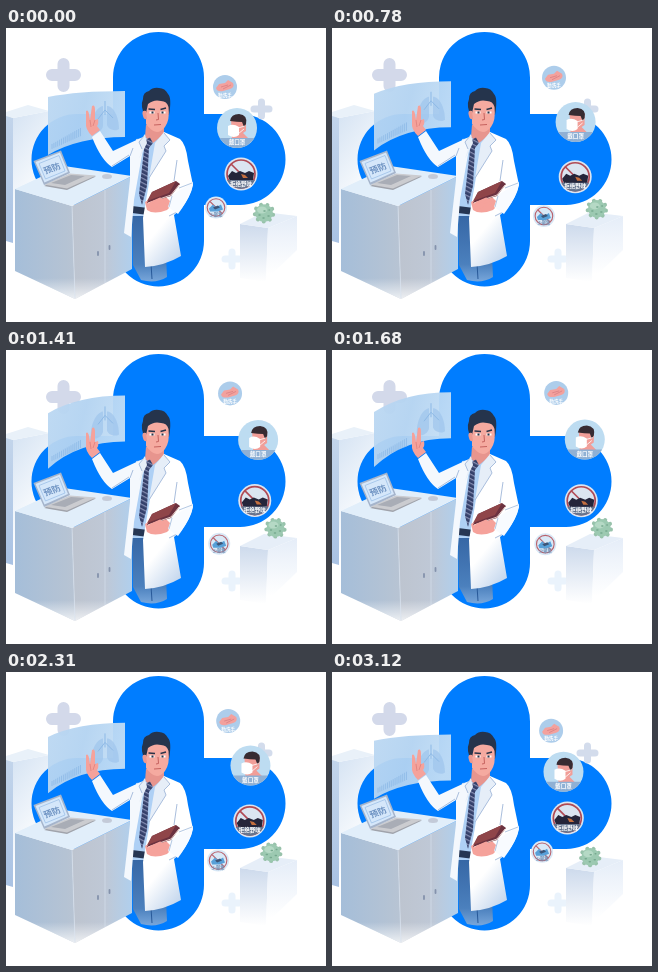
Write an HTML page that moves like this. It is 320 px wide and 294 px high and loops after 3150 ms.

```html
<!DOCTYPE html>
<html lang="zh">
<head>
<meta charset="utf-8">
<style>
html, body { margin: 0; width: 100%; height: 100%; overflow: hidden; background: #fff; }
svg { display: block; width: 100vw; height: 100vh; }
text { font-family: "Noto Sans CJK SC", "Noto Sans CJK", "Noto Sans", sans-serif; text-anchor: middle; font-weight: 700; }
</style>
</head>
<body>
<svg viewBox="0 0 320 294">
  <defs>
    <linearGradient id="pillar" x2=".35" y2="1"><stop stop-color="#d5e3f3"/><stop offset=".85" stop-color="#fff"/></linearGradient>
    <linearGradient id="pillarDark" x2="0" y2="1"><stop stop-color="#c3d5eb"/><stop offset="1" stop-color="#a9c2e3"/></linearGradient>
    <linearGradient id="standLeft" x2="0" y2="1"><stop stop-color="#cddaec"/><stop offset="1" stop-color="#fff"/></linearGradient>
    <linearGradient id="standRight" x2="0" y2="1"><stop stop-color="#e5edf8"/><stop offset=".9" stop-color="#fff"/></linearGradient>
    <linearGradient id="cabLeft"><stop stop-color="#a5bed9"/><stop offset="1" stop-color="#b8c4d3"/></linearGradient>
    <linearGradient id="cabRight"><stop stop-color="#bdc4cf"/><stop offset=".55" stop-color="#bfc8d6"/><stop offset="1" stop-color="#b0cfed"/></linearGradient>
    <linearGradient id="mist" x2="0" y2="1"><stop offset=".83" stop-color="#fff" stop-opacity="0"/><stop offset="1" stop-color="#fff" stop-opacity=".75"/></linearGradient>
    <linearGradient id="glass" x2="1" y2=".25"><stop stop-color="#bcd8f2"/><stop offset=".5" stop-color="#b3d3f1"/><stop offset="1" stop-color="#c4def5"/></linearGradient>
    <linearGradient id="coat" x1=".3" x2=".75" y2="1"><stop offset=".6" stop-color="#fff"/><stop offset="1" stop-color="#b9cfea"/></linearGradient>
    <linearGradient id="jeans" x2="0" y2="1"><stop stop-color="#3565a3"/><stop offset=".75" stop-color="#4b80bd"/><stop offset="1" stop-color="#78a6da"/></linearGradient>
    <pattern id="tie" width="5" height="4" patternUnits="userSpaceOnUse" patternTransform="rotate(28)"><path fill="#34406a" d="M0 0h5v4H0z"/><path fill="#8890b4" d="M0 0h5v1.200H0z"/></pattern>
  </defs>

  <!-- backdrop -->
  <path fill="url(#pillar)" d="M7 90 43 83V185L7 215Z"/>
  <path fill="url(#pillarDark)" d="M0 87 7 90V215L0 213Z"/>
  <path fill="#e9f1f9" d="M0 84 22 77 43 83 7 90 0 88Z"/>
  <path fill="#007dff" d="M107 86V49.500a45.500 45.500 0 0 1 91 0V86h36a45.500 45.500 0 0 1 0 91h-36v36a45.500 45.500 0 0 1-91 0v-36H71A45.500 45.500 0 0 1 71 86Z"/>
  <g stroke-linecap="round" fill="none">
    <path stroke="#d3d9ea" stroke-width="12" d="M46 47H69M57.500 36V58"/>
    <path stroke="#d3dcec" stroke-width="7" d="M248 81H263M255.500 74V88"/>
    <path stroke="#eaf3fc" stroke-width="7" d="M219 231H233M226 224V238"/>
  </g>
  <path fill="url(#standLeft)" d="M234 196 262 200 260 254 234 250Z"/>
  <path fill="url(#standRight)" d="M262 200 291 188V222L260 252Z"/>
  <path fill="#e6eef8" d="M234 196 258 184 291 188 262 200Z"/>

  <!-- hologram -->
  <path id="panel" fill="url(#glass)" opacity=".95"/>
  <g id="scan" fill="none" stroke="#8db9e6">
    <path id="ribs" stroke-width=".8"/>
    <path fill="#a0c6ec" stroke="none" opacity=".75" d="M97 78C90 79 84 92 85 104 90 107 96 103 97 98ZM101 78C107 78 113 88 113 101 109 104 102 101 101 97Z"/>
    <path d="M99 73V87M99 82 92 91M99 82 107 90"/>
  </g>

  <!-- cabinet -->
  <path fill="url(#cabLeft)" d="M9 161 66 178 69 271 9 243Z"/>
  <path fill="url(#cabRight)" d="M66 178 126 148V241L69 271Z"/>
  <path fill="url(#mist)" d="M9 161 66 178 126 148V241L69 271 9 243Z"/>
  <path fill="#e1eefa" d="M9 161 58 138 126 148 66 178Z"/>
  <path fill="none" stroke="#d5e0ee" stroke-width=".7" d="M66 178 69 270M99 162V255"/>
  <path stroke="#8492ac" stroke-width="1.800" stroke-linecap="round" d="M92 224v3M103.500 218v3"/>
  <ellipse cx="101" cy="148.500" rx="5" ry="2.500" fill="#c3cad8"/>
  <path fill="#a0a3ab" d="M38 158 64 146 90 148.500 61 162Z"/>
  <path fill="#cbccd0" d="M38 156.500 64 145.500 90 147.500 61 160.500Z"/>
  <path fill="#a9adb6" d="M45 155 65 147 79 148 59 157Z"/>
  <path fill="#a5b4cb" d="M27.500 133 55 122.500 64 145 38 157Z"/>
  <path fill="#d5e7fa" d="M29.500 134 54 124.500 62 144 38.500 154.500Z"/>
  <path fill="none" stroke="#9dc0e8" stroke-width=".8" d="M33 135.500 53 127.500 59 143 39.500 151Z"/>
  <text transform="translate(47.500 143) rotate(-20) skewX(8)" font-size="8.500" fill="#6c91c1">预防</text>

  <!-- doctor -->
  <path fill="url(#jeans)" d="M126 184H158L161 249Q150 256 135 252L127 237Z"/>
  <path fill="none" stroke="#285999" d="M142 190 146 251"/>
  <path fill="#aed0f5" d="M130 111 159 108 154 188H126Z"/>
  <path fill="#263653" d="M126 178 142 180V187L126 185Z"/>
  <path fill="#e7958e" d="M140 97H158V106L147 115 139 109Z"/>
  <path fill="url(#tie)" d="M139 112 144 109.500 147 115 143 120 141 158 136 177 133 166 138 122Z"/>
  <path fill="#25344c" d="M139 88Q134 78 137 71 137 64 143 63 147 59 153 60 159 60 162 66 166 70 163 87L151 78Z"/>
  <path fill="#f5aaa0" d="M140 85 142 76Q148 71 155 73 161 73 162.500 79 164 92 159 99 155 104 151 104 145 103 140 96Z"/>
  <path fill="#eb9990" d="M140 83Q135 82 137 88 138 92 141 91Z"/>
  <path fill="none" stroke="#293449" stroke-width="1.500" d="M142.500 81 149 81.500M154.500 81.500 160 80"/>
  <path stroke="#fff" stroke-width="2" d="M143.500 84.500h5M154.500 84.500h5"/>
  <path stroke="#293449" stroke-width="2.200" d="M145.500 84.500h2M155.500 84.500h2"/>
  <path fill="none" stroke="#c5625f" d="M152 85 152.500 91.500 150 92M148 97 155 96.500"/>
  <path fill="#f4f8fd" d="M137 109 124 115 107 123 94 103 86 109Q95 132 106 139L124 128 124 152 118 205 125 209 128 172 137 121Z"/>
  <path fill="url(#coat)" d="M158 104 174 111Q180 116 182 133L187 157Q185 168 175 181L168 187 175 228Q158 238 139 239L137 190 148 126Z"/>
  <path fill="#e6eef8" d="M139 106 133 114 136 121 133 131 141 115ZM158 104 164 112 158 118 160 123 143 150 149 115Z"/>
  <path fill="none" stroke="#a9bedd" d="M158 105 164 112 158 118 160 123 143 150M138 108 133 114 136 121M124 128 127 120M171 132 168 153M163 188 171 184M106 138 123 127"/>
  <path fill="#f5a29b" d="M94 102 86 108Q79 101 80 95L80 83Q82 81 83 86L84 92 86 78Q89 76 89 82L89 92 92 91Q93 96 91 98Z"/>
  <path fill="none" stroke="#de817e" stroke-width=".8" d="M84 92 85 99M89 92 87 98"/>
  <path fill="#f5a29b" d="M139 174Q148 168 160 169L167 176 161 182Q148 187 141 182Z"/>
  <path fill="#6b3240" d="M146 164 170 153 174 156 165 168 141 175Z"/>
  <path fill="#8f4549" d="M146 164 170 153 163 165 141 173Z"/>
  <path fill="none" stroke="#f2dfd9" stroke-width=".9" d="M142 175 165 167 173 157"/>
  <path fill="none" stroke="#f5a29b" stroke-width="3" stroke-linecap="round" d="M145 175 154 171M147 179 158 175"/>
  <path fill="#f8fbff" d="M166 167 187 154Q186 167 172 186L162 179Z"/>
  <path fill="none" stroke="#b3c8e3" d="M166 168 163 179M173 160 186 155"/>

  <!-- floating badges -->
  <g id="wash">
    <circle r="12" fill="#adcdeb"/>
    <path fill="#f3a19d" d="M-9 1-6-3 0-4 3-7 8-4Q10 0 5 2L-2 4Q-8 5-9 1Z"/>
    <path fill="none" stroke="#d97f83" stroke-width=".8" d="M-4 0 3-2M-2 2 6-2"/>
    <text y="9.800" font-size="4.600" fill="#fff">勤洗手</text>
  </g>
  <g id="mask">
    <circle r="20" fill="#bddcf1"/>
    <path fill="#f19e98" d="M-6-9H9L9 3 6 5 13 12H-5Z"/>
    <path fill="#372b32" d="M-7-7Q-6-14 2-14 11-13 9-4L7-1 5-6Q0-6-7-7Z"/>
    <path fill="#fff" d="M-9-2Q-4-5 2-1L2 7Q-3 11-9 7Z"/>
    <path stroke="#fff" stroke-width=".8" fill="none" d="M1 0 8-2M1 6 7 1"/>
    <path fill="#8fb0d4" d="M-17.300 10H17.300A20 20 0 0 1-17.300 10Z"/>
    <text y="16" font-size="5.600" fill="#fff">戴口罩</text>
  </g>
  <g id="game">
    <circle r="16.500" fill="#dbe5f1"/>
    <g fill="none" stroke="#b04a55" stroke-width="1.700"><circle r="14"/><path d="M-10-10 10 10"/></g>
    <path fill="#25253a" d="M-13 2-9-3-5-1-1-3 4-1 8-3 13-1 12 6 6 7-11 7Z"/>
    <path fill="#c56f3f" d="M0 0 4 1 7 4 2 4Z"/>
    <path fill="#66758f" d="M-14 6H14Q10 14 0 15-10 14-14 6Z"/>
    <text y="11.500" font-size="5.500" fill="#fff">拒绝野味</text>
  </g>
  <g id="crowd">
    <circle r="11" fill="#d9e9f7"/>
    <g fill="none" stroke="#b9626c" stroke-width="1.100"><circle r="8.800"/><path d="M-6-6 6 6"/></g>
    <path fill="#58a0d8" d="M-7 1-3-3 0 0 5-3 7 2 2 4-6 4Z"/>
    <path fill="#3c5578" d="M-3 0 2-2 4 0-1 2Z"/>
    <text y="8" font-size="4.300" fill="#6f8fb4">少聚集</text>
  </g>
  <g id="virus"></g>
</svg>
<script>
const LOOP = 3150;
const $ = id => document.getElementById(id);
const mix = (a, b, p) => a + (b - a) * p;
const swing = (t, peak) => t < peak ? t / peak : (LOOP - t) / (LOOP - peak);
const soften = p => mix(p, Math.sin(p * Math.PI / 2), 0.25);

// id: [start x, start y, far x, far y]
const drift = {
  wash: [219, 59, 224.5, 42],
  mask: [231, 100, 254, 89],
  game: [235, 146, 250, 151],
  crowd: [210, 179.5, 213.5, 195],
  virus: [258, 185, 270.5, 177.5]
};

function buildVirus() {
  let spikes = '';
  for (let i = 0; i < 9; i++) {
    const a = i * Math.PI * 2 / 9 + 0.2;
    const x = Math.cos(a), y = Math.sin(a);
    spikes += `<path stroke="#98c2ab" stroke-width="4" stroke-linecap="round" d="M${x * 6} ${y * 6}L${x * 9.3} ${y * 8.5}"/>`;
  }
  $('virus').innerHTML = spikes +
    '<circle r="8.8" fill="#9cc9b1"/><ellipse cx="-2" cy="-3" rx="5" ry="3.5" fill="#b5d9c5"/>' +
    '<path stroke="#76a98f" stroke-width="1.5" stroke-linecap="round" d="M-5 2h1M0-2h1M4 3h1M-1 5h1M5-3h.5"/>';
}

function buildRibs() {
  let d = '';
  for (let i = 0; i < 16; i++) {
    const x = 46 + i * 1.9, y = 121 - i * 0.85;
    d += `M${x} ${y}v${-5 - i * 0.22}`;
  }
  $('ribs').setAttribute('d', d);
}

function render(t) {
  const p = soften(swing(t, LOOP / 2));
  for (const [id, [x, y, fx, fy]] of Object.entries(drift)) {
    $(id).setAttribute('transform', `translate(${mix(x, fx, p)} ${mix(y, fy, p)})`);
  }
  const lift = swing(t, 1700);
  const topL = mix(69, 62, lift), topR = mix(63, 42, lift);
  const lowL = mix(127, 117, lift), lowR = mix(109, 88, lift);
  $('panel').setAttribute('d',
    `M42 ${topL}Q72 ${topR} 119 ${topR}V${lowR}Q72 ${lowR} 42 ${lowL}Z`);
  $('scan').setAttribute('transform', `translate(0 ${-20 * lift})`);
  $('ribs').setAttribute('transform', `translate(0 ${8 * lift})`);
}

function tick(now) {
  render(now % LOOP);
  requestAnimationFrame(tick);
}

buildVirus();
buildRibs();
render(0);
requestAnimationFrame(tick);
</script>
</body>
</html>
```
